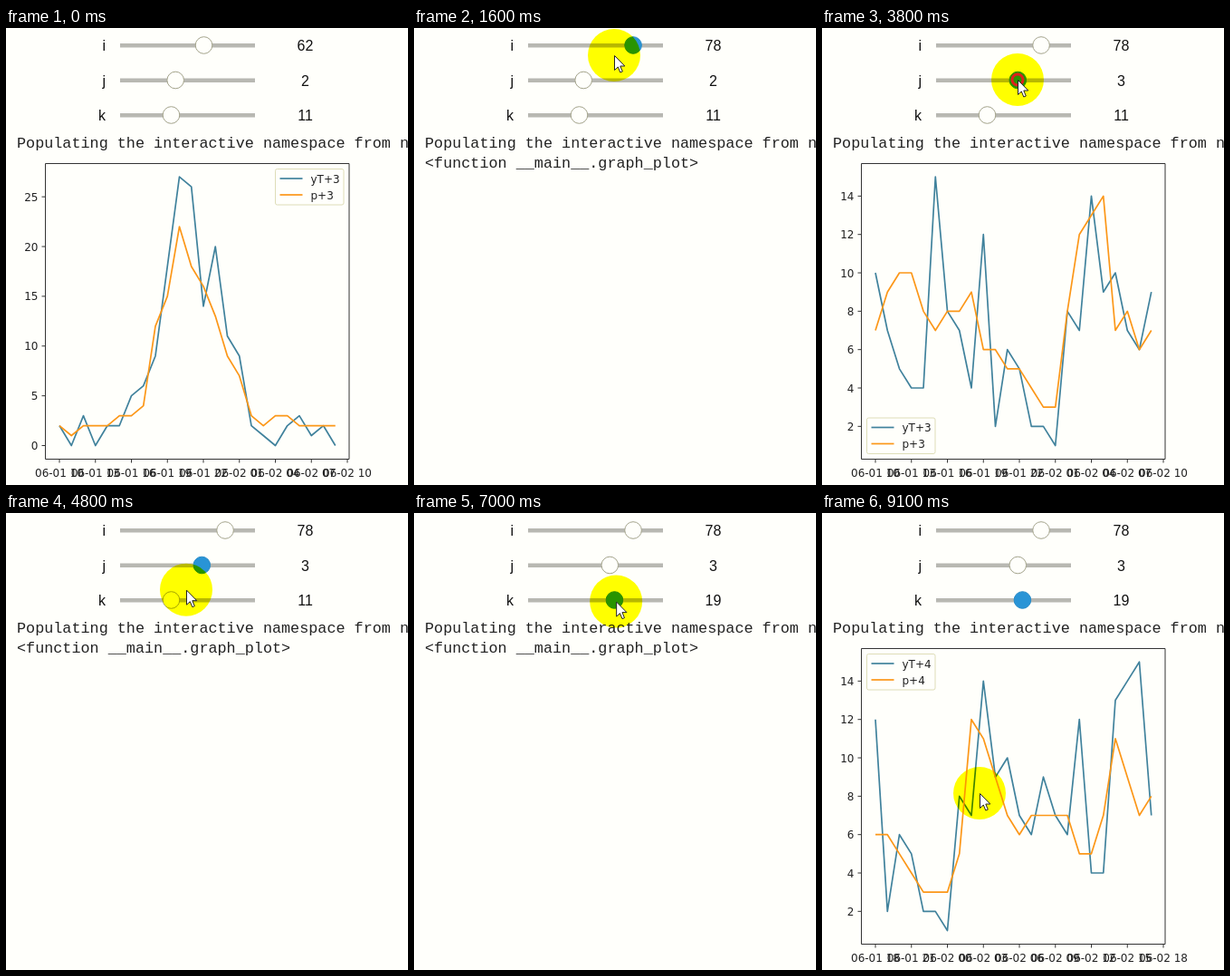
Recreate the animation shown at these times as an HTML page. Size 444x504 px, loop 10 s.

```html
<!DOCTYPE html>
<html lang="en">
<head>
<meta charset="utf-8">
<title>Sliders and plot</title>
<style>
  html, body { margin: 0; width: 100%; height: 100%; overflow: hidden; background: #fffffb; }
  svg { display: block; }
  .ui { font: 16px "Liberation Sans", Arial, sans-serif; fill: #111; }
  .out { font: 16.8px "Liberation Mono", "Courier New", monospace; fill: #222; }
  .plot text { font: 12px "DejaVu Sans", sans-serif; fill: #222; }
  .plot polyline, .plot path { fill: none; stroke-width: 1.7; stroke-linejoin: round; }
  .plot .axis { stroke: #333; stroke-width: 1; }
  .glow { mix-blend-mode: multiply; }
</style>
</head>
<body>
<svg id="stage" width="444" height="504" viewBox="0 0 444 504"></svg>
<script>
const stage = document.getElementById('stage');
const BLUE = '#40829c', ORANGE = '#fc9718';
const LEFT = 43.5, RIGHT = 379, TOP = 149.5, BOTTOM = 475.5;

// Actual values for i = 78; each plot shows a 24 hour window of them
const actual = [10, 7, 5, 4, 4, 15, 8, 7, 4, 12, 2, 6, 5, 2, 2, 1, 8, 7, 14, 9, 10, 7, 6, 9,
  7, 6, 12, 4, 4, 13, 14, 15, 7];
const forecast = [8, 9, 9, 10, 10, 7, 7, 8, 6, 6, 5, 4, 3, 3, 3, 5, 12, 11, 9, 7, 6, 7, 7, 7,
  7, 5, 5, 7, 11, 9, 7, 8];
const windowAt = (data, start) => data.slice(start, start + 24);

const plots = {
  first: { y: [2, 0, 3, 0, 2, 2, 5, 6, 9, 18, 27, 26, 14, 20, 11, 9, 2, 1, 0, 2, 3, 1, 2, 0],
    p: [2, 1, 2, 2, 2, 3, 3, 4, 12, 15, 22, 18, 16, 13, 9, 7, 3, 2, 3, 3, 2, 2, 2, 2],
    ahead: 3, hour: 10, tick: 5, legend: [297.5, 155.5] },
  place: { y: windowAt(actual, 0),
    p: [7, 9, 10, 10, 8, 7, 8, 8, 9, 6, 6, 5, 5, 4, 3, 3, 8, 12, 13, 14, 7, 8, 6, 7],
    ahead: 3, hour: 10, tick: 2, legend: [49.5, 430] },
  ahead: { y: windowAt(actual, 1), p: windowAt(forecast, 0),
    ahead: 4, hour: 10, tick: 2, legend: [297.5, 155.5] },
  later: { y: windowAt(actual, 9), p: windowAt(forecast, 8),
    ahead: 4, hour: 18, tick: 2, legend: [49.5, 155.5] }
};

// [start time, plot]; no plot means cleared output
const outputs = [[0, 'first'], [1500], [2900, 'place'], [4200], [4900, 'ahead'],
  [6500], [7600, 'later']];

const sliders = [
  { name: 'i', y: 19, x0: 127.4, step: 1.47, keys: [[300, 62], [1000, 78]], focus: [300, 3600] },
  { name: 'j', y: 57.5, x0: 129, step: 29.1, keys: [[3600, 2], [3700, 3]], focus: [3600, 5800] },
  { name: 'k', y: 96, x0: 128.9, step: 4.87, keys: [[5800, 11], [6200, 19]], focus: [5800, 10000] }
];

// [time, x, y]
const path = [[100, 206, 15], [300, 219, 19], [1100, 242, 19], [1300, 239, 24], [1400, 239, 24],
  [1600, 221, 30], [2400, 190, 58], [3500, 190, 58], [3600, 187, 57], [3800, 216, 57],
  [4300, 216, 58], [4600, 208, 78], [5200, 181, 98], [5800, 181, 98], [6300, 225, 99],
  [6400, 225, 99], [7700, 221, 96], [8600, 221, 96], [8800, 207, 190], [9000, 178, 325],
  [9100, 174, 309]];

function along(keys, t, n = 1) {
  const k = keys.findIndex(key => key[0] > t);
  if (k < 0) return keys[keys.length - 1][n];
  if (k === 0) return keys[0][n];
  const a = keys[k - 1], b = keys[k];
  return a[n] + (b[n] - a[n]) * (t - a[0]) / (b[0] - a[0]);
}

const text = (x, y, s, more = '') => `<text x="${x}" y="${y}" ${more}>${s}</text>`;
const middle = 'text-anchor="middle"', end = 'text-anchor="end"';

function drawSlider(s, t) {
  const value = Math.round(along(s.keys, t));
  const active = t >= s.focus[0] && t < s.focus[1];
  const look = active ? 'fill="#2994d6" stroke="#2a8cc8"' : 'fill="#fffffb" stroke="#a4a48c"';
  return `<rect x="126" y="${s.y - 2}" width="149" height="4.5" fill="#b8b8b2"/>
    <circle cx="${s.x0 + value * s.step}" cy="${s.y}" r="9.3" ${look}/>
    <g class="ui">${text(110, s.y + 6, s.name, end)}${text(330.5, s.y + 6, value, middle)}</g>`;
}

function drawPlot({ y, p, ahead, hour, tick, legend: [lx, ly] }) {
  const max = Math.max(...y), min = Math.min(...y);
  const px = h => 59 + h * 13.25;
  const py = v => 460.5 - (v - min) / (max - min) * 296.3;
  const line = (data, color) =>
    `<polyline stroke="${color}" points="${data.map((v, h) => px(h) + ',' + py(v)).join(' ')}"/>`;
  const key = (dy, color, label) =>
    `<path stroke="${color}" d="M${lx + 5} ${ly + dy}h25"/>` + text(lx + 39, ly + dy + 4.5, label);

  let s = line(y, BLUE) + line(p, ORANGE);
  let axis = `M${LEFT} ${TOP}H${RIGHT}V${BOTTOM}H${LEFT}Z`;
  for (let h = 0; h < 27; h += 3) {
    const clock = hour + h, day = clock < 24 ? 1 : 2;
    axis += `M${px(h)} ${BOTTOM}v4`;
    s += text(px(h), 494.5, `06-0${day} ${String(clock % 24).padStart(2, '0')}`, middle);
  }
  for (let v = Math.ceil(min / tick) * tick; v <= max; v += tick) {
    axis += `M${LEFT} ${py(v)}h-4`;
    s += text(35.5, py(v) + 4.5, v, end);
  }
  return `<g class="plot">${s}<path class="axis" d="${axis}"/>
    <rect x="${lx}" y="${ly}" width="75.5" height="39.5" rx="2" fill="#fffffb" stroke="#deddb8"/>
    ${key(10.5, BLUE, 'yT+' + ahead)}${key(28.5, ORANGE, 'p+' + ahead)}</g>`;
}

function drawPointer(t) {
  if (t < 100) return '';
  const press = sliders.map(s => t - s.focus[0]).find(d => d >= 0 && d < 400);
  const ring = press === undefined ? '' :
    `<circle r="${3 + press * 0.015}" fill="none" stroke="#e0201c" stroke-width="3"/>`;
  const at = `transform="translate(${along(path, t, 1)} ${along(path, t, 2)})"`;
  return `<circle class="glow" r="29" fill="#ff0" ${at}/>
    <g ${at}>${ring}<path d="M.5.5V16.5L4.3 13 6.8 19 9.3 18 6.8 12H11.8Z" fill="#fff" stroke="#222"/></g>`;
}

function draw(t) {
  const name = outputs.filter(o => o[0] <= t).pop()[1];
  stage.innerHTML = '<rect width="444" height="504" fill="#fffffb"/>' +
    sliders.map(s => drawSlider(s, t)).join('') +
    text(12, 132, 'Populating the interactive namespace from n', 'class="out"') +
    (name ? drawPlot(plots[name])
      : text(12, 153.5, '&lt;function __main__.graph_plot&gt;', 'class="out"')) +
    drawPointer(t);
}

let start, shown;
function tick(now) {
  start ??= now;
  const t = Math.floor((now - start) % 10000 / 100) * 100;
  if (t !== shown) draw(shown = t);
  requestAnimationFrame(tick);
}
draw(0);
requestAnimationFrame(tick);
</script>
</body>
</html>
```
